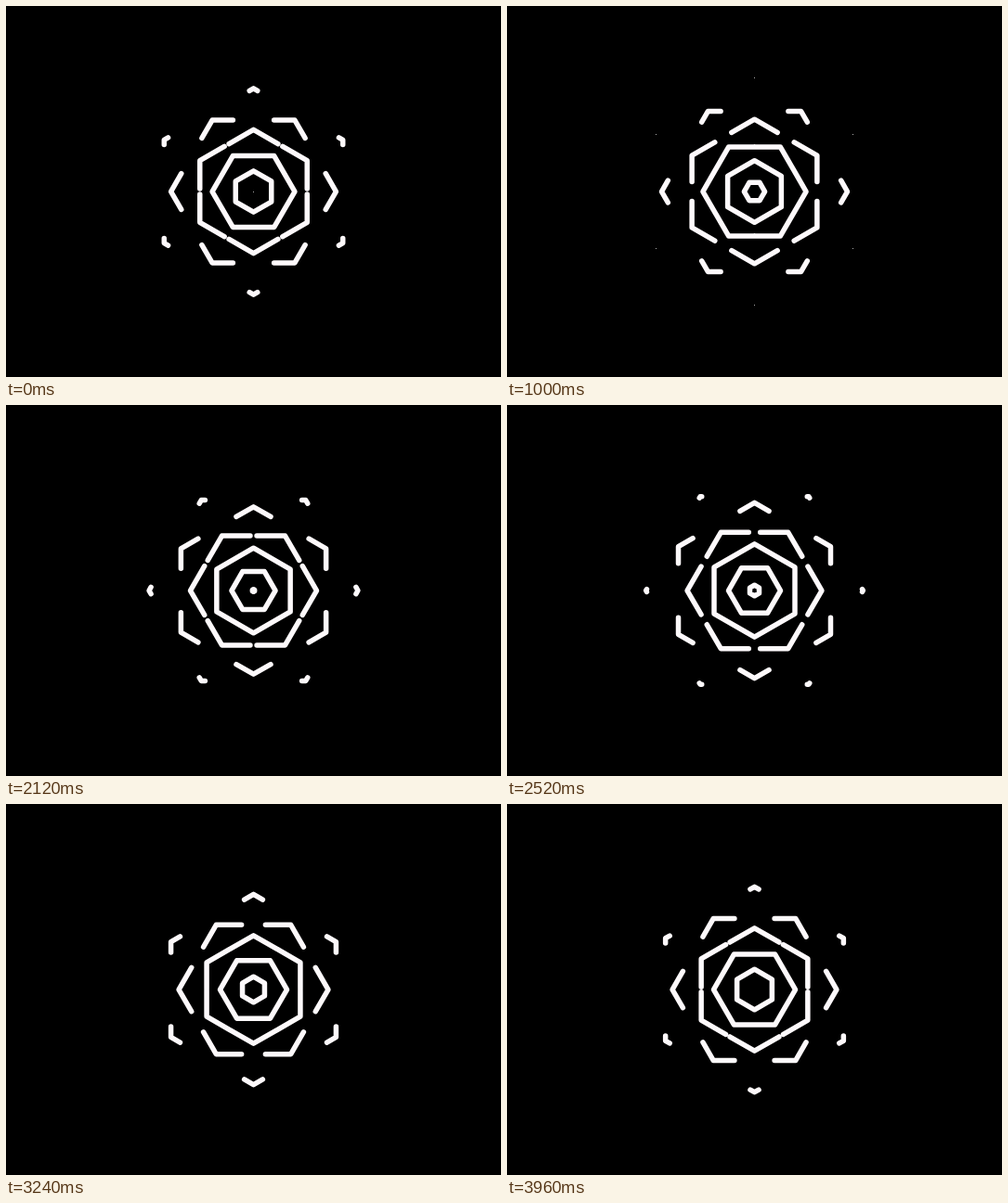
An HTML page with a canvas for the animation above (4000 ms loop, 533 by 400 pixels).

```html
<!DOCTYPE html>
<html lang="en">
<head>
<meta charset="utf-8">
<title>Expanding hexagons</title>
<style>
  html, body { margin: 0; width: 100%; height: 100%; overflow: hidden; background: #000; }
  canvas { display: block; }
</style>
</head>
<body>
<canvas id="stage" width="533" height="400"></canvas>
<script>
const ctx = document.getElementById('stage').getContext('2d');
const CX = 266.5, CY = 200;
const LOOP = 4000, SPACING = 22.22, STROKE = 5.5;
const SPLIT_START = 54, SPLIT_END = 124;
const INK = '#fdf9fb';

const smooth = x => {
  const p = Math.max(0, Math.min(1, x));
  return p * p * (3 - 2 * p);
};

const corner = (radius, angle) => [
  CX + radius * Math.cos(angle),
  CY + radius * Math.sin(angle)
];

const mix = (a, b, f) => [a[0] + (b[0] - a[0]) * f, a[1] + (b[1] - a[1]) * f];

// Each corner owns half of both neighbouring edges; the halves retract as the ring grows.
function drawRing(radius, turn) {
  const reach = smooth((SPLIT_END - radius) / (SPLIT_END - SPLIT_START)) / 2;
  const isDot = radius < 0.2 || reach * radius < 0.25;
  const points = Array.from({ length: 6 }, (_, i) => corner(radius, turn + i * Math.PI / 3));

  if (isDot) {
    ctx.fillStyle = '#aaa';
    const dots = radius < 0.2 ? points.slice(0, 1) : points;
    for (const [x, y] of dots) ctx.fillRect(Math.floor(x), Math.floor(y), 1, 1);
    return;
  }

  ctx.beginPath();
  if (reach === 0.5) {
    points.forEach(p => ctx.lineTo(...p));
    ctx.closePath();
  } else {
    points.forEach((p, i) => {
      ctx.moveTo(...mix(p, points[(i + 5) % 6], reach));
      ctx.lineTo(...p);
      ctx.lineTo(...mix(p, points[(i + 1) % 6], reach));
    });
  }
  ctx.stroke();
}

function draw(time) {
  const phase = (time % LOOP) / LOOP * 2;
  ctx.fillStyle = '#000';
  ctx.fillRect(0, 0, 533, 400);
  ctx.strokeStyle = INK;
  ctx.lineWidth = STROKE;
  ctx.lineCap = ctx.lineJoin = 'round';

  for (let k = -1; k < 6; k++) {
    const radius = (k + phase) * SPACING;
    if (radius >= 0 && radius < SPLIT_END) drawRing(radius, k % 2 ? Math.PI / 6 : 0);
  }
}

const start = performance.now();
function tick() {
  draw(performance.now() - start);
  requestAnimationFrame(tick);
}
tick();
</script>
</body>
</html>
```
